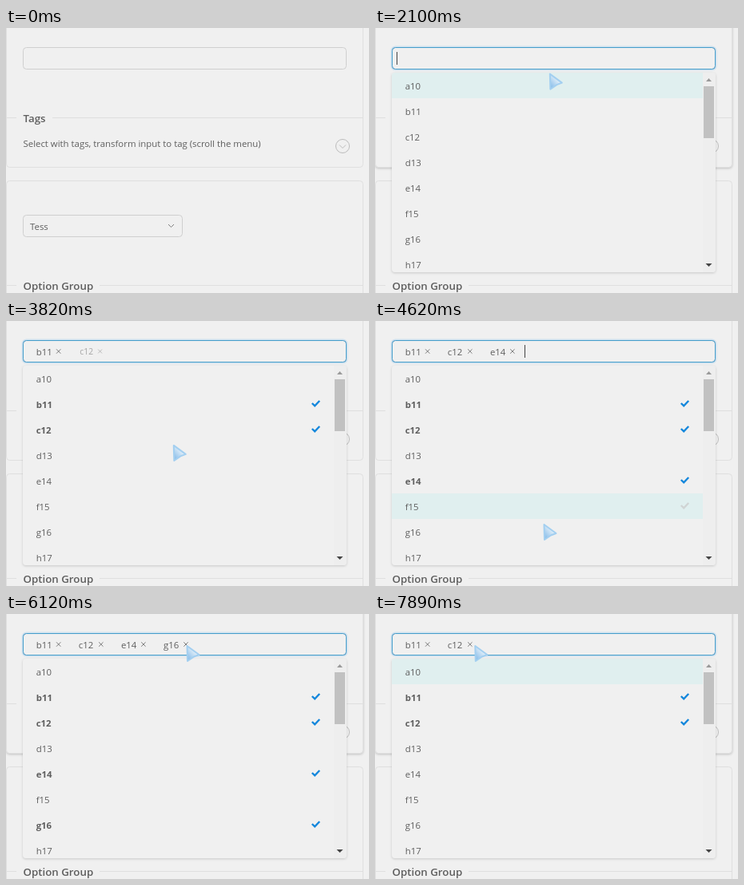
An HTML page for the animation above (7.99 s loop, 454 px wide and 332 px high).

```html
<!DOCTYPE html>
<html lang="en">
<head>
<meta charset="utf-8">
<title>Tag select</title>
<style>
  html, body { margin: 0; width: 100%; height: 100%; overflow: hidden; background: #f0f0f0; }
  svg { display: block; width: 454px; height: 332px; }
  text { font: 11.4px "Open Sans", "Noto Sans", sans-serif; fill: #5e5e5e; white-space: pre; }
  .title { font-size: 13.3px; font-weight: 600; }
  .bold { font-weight: 700; }
  .line { fill: none; stroke: #dfdfdf; }
  .box { fill: #f0f0f0; stroke: #cfcfcf; }
  .icon { fill: none; stroke: #7c7c7c; }
  .faint { fill: none; stroke: #bcbcbc; }
  .hovered { filter: drop-shadow(0 1px 1.5px rgba(0, 0, 0, .2)); }
  .menu { filter: drop-shadow(0 1px 1.5px rgba(0, 0, 0, .17)); }
</style>
</head>
<body>
<svg id="stage" viewBox="0 0 454 332"></svg>
<script>
const stage = document.getElementById('stage');
const LOOP = 7990, APPEAR = 100, OPEN = 1700;
const MENU_TOP = 56, ROW = 32, GLIDE = 500, HOVER_LAG = 150;
const options = [...'abcdefgh'].map((letter, i) => letter + (10 + i));

// Chosen options in order, with the times of choosing and removing
const picks = [
  { row: 1, on: 2900, off: Infinity },
  { row: 2, on: 3720, off: Infinity },
  { row: 4, on: 4250, off: 7400 },
  { row: 6, on: 5120, off: 6520 },
];
const tagX = i => 37.7 + 53.1 * i;
const closeX = i => tagX(i) + 28;
const rowY = i => MENU_TOP + ROW * i;

// Pointer stops: [arrival time, x, y]
const stops = [[APPEAR, 268, 148], [800, 232, 57], [1200, 229, 42], [2150, 217, 57],
  [2600, 210, 100], [3420, 208, 140], [4150, 209, 195], [4660, 210, 255],
  [5700, closeX(3), 39], [7200, closeX(2), 39], [7890, closeX(1) + 5, 39]];

const ramp = (t, start, length) => Math.max(0, Math.min(1, (t - start) / length));
const mix = (a, b, p) => a + (b - a) * p;
const mixColor = (a, b, p) => `rgb(${a.map((v, i) => Math.round(mix(v, b[i], p)))})`;
const label = (x, y, s, cls = '') => `<text x="${x}" y="${y}" class="${cls}">${s}</text>`;
const shape = (d, cls, extra = '') => `<path d="${d}" class="${cls}" ${extra}/>`;
const rect = (x, y, w, h, extra) => `<rect x="${x}" y="${y}" width="${w}" height="${h}" ${extra}/>`;
const group = (attrs, content) => `<g ${attrs}>${content}</g>`;

// Each move ends at its stop and takes GLIDE ms, or less if the stops are closer
function pointerAt(t) {
  let [before, x, y] = stops[0];
  for (const [arrive, nextX, nextY] of stops.slice(1)) {
    const length = Math.min(GLIDE, arrive - before);
    const p = ramp(t, arrive - length, length), eased = p * p * (3 - 2 * p);
    x = mix(x, nextX, eased);
    y = mix(y, nextY, eased);
    before = arrive;
  }
  return [x, y];
}

// Above the list, the first option is active until a pick and again after a removal
function activeRow(t) {
  const row = Math.floor((pointerAt(t - HOVER_LAG)[1] - MENU_TOP) / ROW);
  if (row >= 0) return row;
  const untouched = t < picks[0].on, removed = picks.some(p => t >= p.off);
  return untouched || removed ? 0 : -1;
}

function glow(t, row) {
  const steps = [0, 30, 60, 90];
  return steps.filter(d => activeRow(t - d) === row).length / steps.length;
}

function page(t) {
  const over = Math.max(ramp(t, 200, 300) * (1 - ramp(t, 2200, 300)), ramp(t, 5700, 300));
  const card = rect(.5, -9.5, 446, 184, 'rx="4" class="line" style="fill:#f0f0f0"');
  return group(`class="hovered" opacity="${over}"`, card) +
    group(`opacity="${1 - over}"`, card) +
    shape(`M0 112.5H13M${over ? 74 : 58} 112.5H447`, 'line') +
    label(21.5, 118, 'Tags', 'title') +
    group(`opacity="${over}"`, shape('M57 116L57.5 114 62.5 108.5 64.5 110.5 59.5 115.5ZM55 118.5H66', 'icon')) +
    label(21.5, 149, 'Select with tags, transform input to tag (scroll the menu)') +
    '<circle cx="421" cy="148" r="8.5" class="faint"/>' +
    shape('M417 146.5L421 150.5 425 146.5', 'faint') +
    rect(.5, 191.5, 446, 160, 'rx="4" class="line"') +
    rect(21.5, 234.5, 199, 27, 'rx="4" class="box"') +
    label(30, 253, 'Tess') + shape('M203 246L206.5 249.5 210 246', 'icon') +
    shape('M0 322.5H13M117 322.5H447', 'line') +
    label(21.5, 328, 'Option Group', 'title');
}

function tag({ row, on, off }, i, t) {
  const p = ramp(t, on, 200) * (1 - ramp(t, off, 200));
  const x = tagX(i), center = x + 16;
  return group(`opacity="${p}" transform="translate(${center} 38) scale(${mix(.8, 1, p)}) translate(${-center} -38)"`,
    label(x, 43, options[row]) + shape(`M${closeX(i) - 2.7} 35.3l5.4 5.4m0-5.4l-5.4 5.4`, 'icon'));
}

function input(t) {
  const focus = ramp(t, OPEN, 250);
  const idle = mixColor([207, 207, 207], [183, 192, 210], ramp(t, 1000, 300));
  const box = 'x="21.5" y="24.5" width="404" height="27" rx="4"';
  const last = [OPEN, ...picks.map(p => p.on)].filter(c => c <= t).pop();
  const blink = (t - last - 150) % 1060;
  const caretOn = t < picks[3].off && blink >= 0 && blink < 530;
  const caretX = Math.round(tagX(picks.filter(p => t >= p.on).length) - 10.5);
  return rect(20.5, 23.5, 406, 29, `rx="5" fill="none" stroke="#108ee9" stroke-width="2" opacity="${.15 * focus}"`) +
    `<rect ${box} fill="#f0f0f0" stroke="${idle}"/>` +
    `<rect ${box} fill="none" stroke="#459ecb" opacity="${focus}"/>` +
    picks.map((pick, i) => tag(pick, i, t)).join('') +
    (caretOn ? rect(caretX, 30, 1, 16, 'fill="#444"') : '');
}

function option(name, i, t) {
  const chosen = picks.some(k => k.row === i && t >= k.on && t < k.off);
  const light = chosen ? 0 : glow(t, i);
  const pointed = pointerAt(t - HOVER_LAG)[1] > MENU_TOP;
  return rect(21, rowY(i), 389, ROW, `fill="#e0efef" opacity="${light}"`) +
    label(37.7, rowY(i) + 21, name, chosen ? 'bold' : '') +
    shape(`M382.8 ${rowY(i) + 15}l3.4 3.4 6-6.4`, '',
      `fill="none" stroke="${chosen ? '#1487dc' : '#d0d4d4'}" stroke-width="2.4" opacity="${chosen ? 1 : pointed ? light : 0}"`);
}

function menu(t) {
  const p = ramp(t, OPEN, 250), scale = mix(.8, 1, 1 - (1 - p) ** 2);
  return group(`opacity="${p}" transform="translate(0 ${MENU_TOP}) scale(1 ${scale}) translate(0 ${-MENU_TOP})"`,
    rect(21, MENU_TOP, 405, 250, 'rx="4" fill="#f0f0f0" class="menu"') +
    '<clipPath id="list"><rect x="21" y="56" width="405" height="250" rx="4"/></clipPath>' +
    group('clip-path="url(#list)"', options.map((name, i) => option(name, i, t)).join('') +
      rect(410, MENU_TOP, 16, 250, 'fill="#eee"') + rect(411, 73, 13, 65, 'fill="#c1c1c1"') +
      shape('M414 67L417.5 63 421 67Z', '', 'fill="#9a9a9a"') +
      shape('M413.5 295H421.5L417.5 299Z', '', 'fill="#444"')));
}

function pointer(t) {
  if (t < APPEAR) return '';
  const [x, y] = pointerAt(t);
  return '<linearGradient id="ice" x1="0" y1="1" x2=".7" y2=".2">' +
    '<stop stop-color="#79b4e6"/><stop offset="1" stop-color="#f2f8fc"/></linearGradient>' +
    group(`transform="translate(${x} ${y})"`,
      shape('M1.5 1L16.5 12 10 14.5 2 20Z', '',
        'fill="url(#ice)" stroke="#a3cff0" stroke-width="2" stroke-linejoin="round"'));
}

function frame(now) {
  const t = now % LOOP;
  stage.innerHTML = page(t) + input(t) + menu(t) + pointer(t);
  requestAnimationFrame(frame);
}
frame(0);
</script>
</body>
</html>
```
